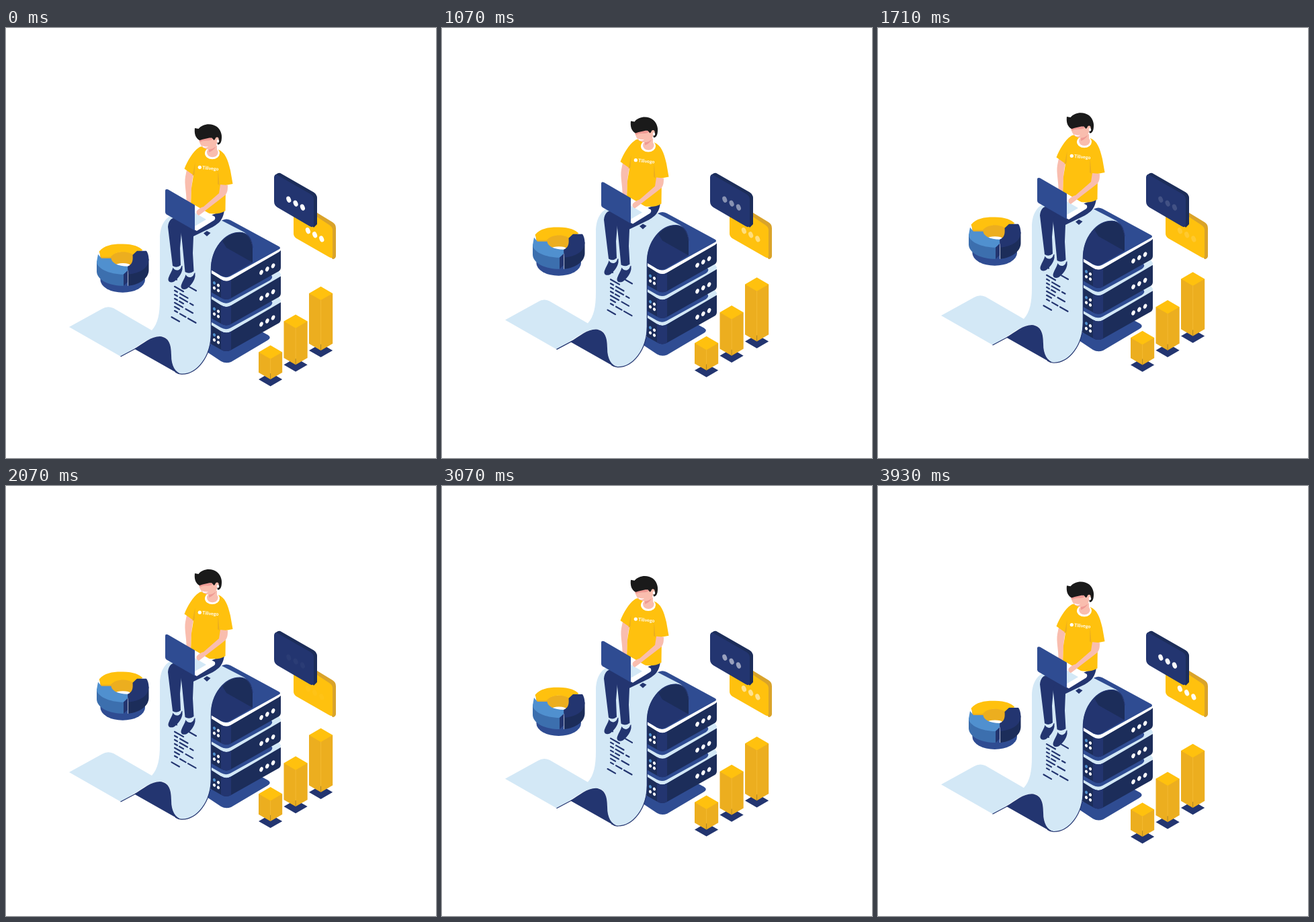
An HTML page with a canvas for the animation above (4000 ms loop, 640 by 640 pixels).

```html
<!DOCTYPE html>
<html lang="en">
<head>
<meta charset="utf-8">
<title>Isometric data scene</title>
<style>
html, body { margin: 0; width: 100%; height: 100%; overflow: hidden; background: #fff; }
canvas { display: block; width: 640px; height: 640px; }
</style>
</head>
<body>
<canvas id="stage" width="640" height="640"></canvas>
<script>
const ctx = document.getElementById('stage').getContext('2d');
const LOOP = 4000, STEPS = 56;
const NAVY = '#233570', DARK = '#1c2d5a', BLUE = '#2f4c92', ICE = '#d3e8f6', WHITE = '#fff';
const YELLOW = '#ffc10e', AMBER = '#ecae1f', SKIN = '#f9bdae', BLUSH = '#ef9a94', BLACK = '#1a1a1a';

// dashes of the printed text: row, left x, right x
const DASHES = [
  [-2, 251, 254], [-2, 273, 283], [0, 251, 264], [1, 251, 255], [1, 259, 270.5],
  [2, 251, 255], [2, 258.5, 270], [2, 274, 278.5], [3, 251, 255], [3, 258, 264],
  [4, 251, 263], [4, 267.5, 278], [5, 251, 258], [6, 251, 255], [6, 259, 267.5],
  [6, 271, 282.5], [8, 246.5, 258]
];

function fill(color, path) {
  ctx.fillStyle = color;
  ctx.fill(new Path2D(path));
}

function stroke(color, width, path) {
  ctx.strokeStyle = color;
  ctx.lineWidth = width;
  ctx.stroke(new Path2D(path));
}

function oval(color, x, y, rx, ry, angle = 0) {
  ctx.fillStyle = color;
  ctx.beginPath();
  ctx.ellipse(x, y, rx, ry, angle, 0, Math.PI * 2);
  ctx.fill();
}

function shifted(x, y, draw) {
  ctx.save();
  ctx.translate(x, y);
  draw();
  ctx.restore();
}

function drawServer(isTop) {
  if (!isTop) fill(ICE, 'M298 360L320 374Q327 378.5 334 375L406 333.5Q409 331.5 409 328L405 322L328 285L298 300Z');
  fill(DARK, 'M298 360V389L320 401.5Q327 406 335 402L406 362Q409 360 409 356V331L334 375Q327 378.5 320 374Z');
  fill(NAVY, 'M320 374Q327 378.5 335 374.5V402Q327 406 320 401.5Z');
  if (isTop) {
    fill(WHITE, 'M298 360L320 374Q327 378.5 334 375L406 333.5Q409 331.5 409 328L328 285L298 300Z');
    fill(BLUE, 'M298 355L320 369Q327 373 334 369.5L407 329Q409.5 327 406 325L334 286Q328 283 322 286L298 300Z');
  }
  for (let i = 0; i < 3; i++) oval(WHITE, 380 + i * 8.8, 363.7 - i * 4.9, 2.5, 3.8, 0.4);
  for (let i = 0; i < 4; i++) {
    const col = i % 2, row = i >> 1;
    oval(i ? WHITE : '#5090cf', 310 + col * 6, 379.5 + col * 3.6 + row * 7.6, 2, 2.5, -0.45);
  }
}

function drawServers() {
  fill(BLUE, 'M296 480L320 496Q327 500 335 497L389 465Q396 461 390 457L340 430Z');
  for (let i = 2; i >= 0; i--) {
    shifted(0, i * 38.6, () => {
      if (i < 2) fill(BLUE, 'M298 395L320 407.5Q327 411.5 334 408L393 375.5Q399 371 394 367L390 350Z');
      drawServer(i === 0);
    });
  }
}

function drawPaper() {
  fill(NAVY, 'M305 360C305 340 312 324 324 315L367 349L333 368.5Q327 372 320 368.5Z');
  fill(DARK, 'M322 317C332 306 340 304 348 304C361 304 367 315 367 328V349L328 327Z');
  fill(ICE, 'M94 445L143 418Q151 413 160 417L217 450C226 440 229 426 229 404V314C229 295 236 282 249 278' +
    'L318 285L351 302C360 306 366 315 367 325C364 310 358 304 348 304C326 304 305 328 305 360V455' +
    'C305 490 284 515 262 515C250 513 246 500 246 486C246 470 242 459 229 459C211 459 194 477 171 489Z');
  fill(NAVY, 'M191 477.5C205 469 216 459 229 459C243 460 246 472 246 487C246 503 252 513 262 515Q257 515 252 512Z');
  stroke(NAVY, 1.2, 'M170.5 489L194 476.5M252 512Q257 515.5 262 515.2C284 515 305 490 305.3 455V360C305.3 328 326 304 348 304.3C359 304 366 314 367 327');
  fill(NAVY, 'M294 305.5L299 302L304.5 305L299 310Z');
  ctx.lineCap = 'round';
  for (const [row, from, to] of DASHES) {
    const y = x => 384.8 + row * 6 + (x - 251) * 0.57;
    stroke(NAVY, 2.2, `M${from} ${y(from)}L${to} ${y(to)}`);
  }
  ctx.lineCap = 'butt';
}

function drawShoe() {
  fill(ICE, 'M249 351H260L260.5 359Q254 363 249 358Z');
  fill(NAVY, 'M248.5 356.5C251 361.5 257 362 260 357.5Q261.5 353 262.5 354V359C261.5 366 256 373 250 377.5C244 380 240 377 242 371.5C244 366 247 362 248.5 356.5Z');
}

function drawLegs() {
  drawShoe();
  shifted(19, 10.5, drawShoe);
  fill(NAVY, 'M241 296C242 285 248 281 256 283L270 288L261 304L259 328L260 353Q254 358 248 354L243 313Z');
  fill(NAVY, 'M260.5 304C262 292 272 290 282 288L325 271C323 288 314 292 308 296L279 310L278 335L279.5 362Q273 367 266.5 363L262.5 322Z');
}

function drawBody() {
  fill(SKIN, 'M269 211L279 218C276 230 276 245 275 262L268.5 258C269 246 265 232 267 221Z');
  fill(YELLOW, 'M287 178C291 175 297 177 300 179L316 181C326 185 330 195 334 212L337.5 232L327 234L326.5 272' +
    'C318 278 303 277 292 274L275 264L276 238L279 219L265.5 209.5C270 198 278 184 287 178Z');
  fill(AMBER, 'M281.5 200L280.5 218L277.5 220Z');
  fill(AMBER, 'M315.5 211C316.5 220 317 226 317.5 234L315 232Z');
  oval(WHITE, 307, 186.5, 11, 8.7);
  oval(SKIN, 307.3, 185.3, 8.3, 7);
  fill(SKIN, 'M301 175H314L314 186H301Z');
  fill(BLUSH, 'M302 178L312 177Q308 183 302 185Z');
  fill(SKIN, 'M286.5 165C288 171 290 175 293 178Q300 182 306 180C312 178 315 174 315 162Z');
  fill(BLUSH, 'M287 166Q296 162 309 164Q305 168 300 167.5Q293 167 289 169.5Z');
  fill(WHITE, 'M292 175Q296 177.5 301 176.3Q298 179.3 293.5 177.5Z');
  fill(BLACK, 'M281 149L286.5 150C293 142 306 141 314 147C321 153 322 161 320.5 168C319.5 172 317 174 315 173.5' +
    'L313 164L309.5 167L306.5 163.5C300 163 293 166 288 167C282 164 280 157 281 149Z');
  oval(SKIN, 313.8, 166.5, 2.7, 4, 0.2);
  oval(WHITE, 315.5, 168.3, 1.7, 2.5);
}

function drawBadge() {
  oval(WHITE, 288.3, 207.3, 2.6, 2.6);
  ctx.save();
  ctx.translate(292, 210.2);
  ctx.rotate(0.085);
  ctx.fillStyle = WHITE;
  ctx.font = 'bold 7px Lato, sans-serif';
  ctx.fillText('Tilivego', 0, 0);
  ctx.restore();
}

function drawLaptop() {
  fill(WHITE, 'M280 263L311 281Q312 284 310 286L284 302L280 300Z');
  fill(ICE, 'M281 275L298 285L281 295Z');
  fill(SKIN, 'M319 233L330 234C330 240 330 245 326 249C316 257 305 265 295 273L287 279Q282 277 284 272Q289 267 294 266L317 246Z');
  fill(BLUE, 'M237 242Q237 239 241 240.3L281 263.5V301.5L239 277.5Q237 276 237 274Z');
}

function drawPie() {
  oval(BLUE, 173.7, 374, 33.3, 19);
  fill(AMBER, 'M155 341C158 331 184 329 190 337V348Q184 356 172 355Q159 354 155 341Z');
  oval(WHITE, 174, 352.6, 11, 3.2);
  fill(AMBER, 'M139 331L142 337L157 337V342L141 344Z');
  fill(YELLOW, 'M138.5 332C147 322 160 320.5 174 320.8C190 321 199 325 203.5 330L189 337C183 331.5 163 330 156 340H142Z');
  fill('#3c6fae', 'M135 346L175 365V383C154 383 136 375 135 362Z');
  fill('#5090cf', 'M137 336L142 342H156.5C157 349 167 354 181 354L181.5 360L175 366C154 366 135 357 135 347Z');
  fill(NAVY, 'M175 366L181.5 360V377L175 383Z');
  fill(WHITE, 'M181.4 360H182.3V383H181.4Z');
  fill(DARK, 'M212.5 343V360C212 372 199 381 182.1 383V361Z');
  fill(NAVY, 'M188.5 337L195 331H209Q212 335 212.5 343C212 357 200 364 182.1 366L181 354C189 351 189 344 188.5 337Z');
}

function drawBar(x, top, bottom) {
  const half = 17.6, rise = 10.2;
  const diamond = y => `M${x - half} ${y}L${x} ${y - rise}L${x + half} ${y}L${x} ${y + rise}Z`;
  fill(NAVY, diamond(bottom));
  fill(AMBER, `M${x - half} ${top + rise}H${x + half}V${bottom - rise}L${x} ${bottom}L${x - half} ${bottom - rise}Z`);
  fill(YELLOW, diamond(top + rise));
  stroke('#f5bd35', 0.8, `M${x} ${top + 2 * rise}V${bottom - 9}`);
  stroke('#9c7c2d', 0.8, `M${x} ${bottom - 9}V${bottom}`);
}

function drawBubbles(dotAlpha) {
  fill('#d9a32a', 'M440 264L463 275L486 289Q491 292 491 298V340Q490 344 486 344L478 330Z');
  fill(YELLOW, 'M428 274V306Q428 310 432 313L481 341Q486 344 486 339V301Q486 296 481 293L440 266Z');
  fill(DARK, 'M400 219L404 216.5Q407 215 410 217L458 244.5Q463 248 463 253V292L458 297Z');
  fill(NAVY, 'M399 223Q399 217 404 219L453 247Q458 250 458 255V293Q457 298 452 295L404 267Q399 264 399 258Z');
  ctx.globalAlpha = dotAlpha;
  for (let i = 0; i < 3; i++) {
    oval(WHITE, 420.8 + i * 10.3, 255.2 + i * 5.9, 3.2, 4.8, -0.4);
    oval(WHITE, 449.4 + i * 10.2, 301.7 + i * 6.1, 3.2, 4.8, -0.4);
  }
  ctx.globalAlpha = 1;
}

function render(time) {
  const step = Math.floor((time % LOOP + 5) * STEPS / LOOP) % STEPS;
  const lift = 1 - Math.abs(1 - 2 * step / STEPS);

  ctx.fillStyle = WHITE;
  ctx.fillRect(0, 0, 640, 640);
  shifted(0, -19.8 * lift, () => {
    drawServers();
    drawPaper();
    drawLegs();
    drawBody();
    drawBadge();
    drawLaptop();
  });
  shifted(0, 0.7 - 46.6 * lift, drawPie);
  shifted(0, -25 * lift, () => {
    drawBar(393.6, 472.2, 523);
    drawBar(431.1, 426.4, 501.2);
    drawBar(468.6, 384.7, 479.9);
  });
  drawBubbles(1 - lift);
}

const start = performance.now();
function tick() {
  render(performance.now() - start);
  requestAnimationFrame(tick);
}
tick();
</script>
</body>
</html>
```
